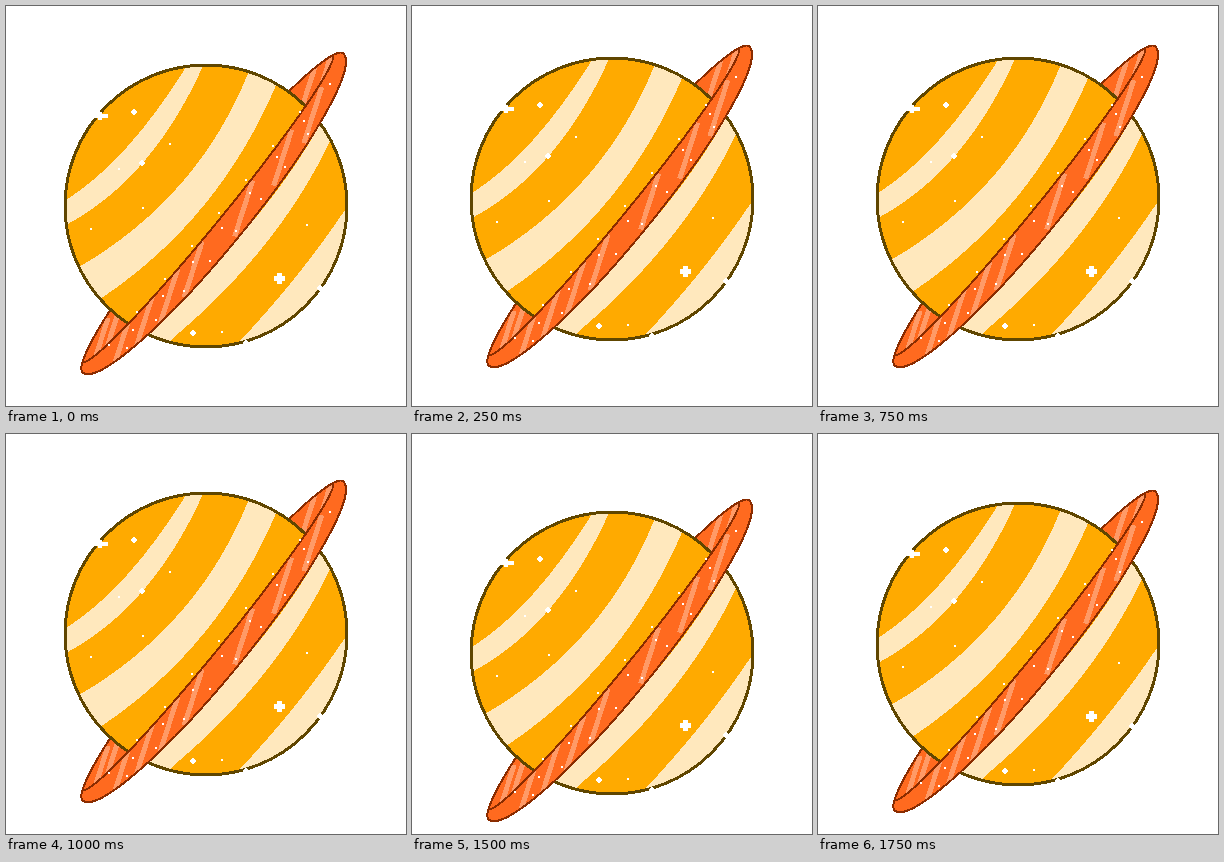
An HTML page that plays this animation: 400x400 px, repeating every 2000 ms.

```html
<!DOCTYPE html>
<html lang="en">
<head>
<meta charset="utf-8">
<title>Ringed planet</title>
<style>
  html, body { margin: 0; height: 100%; overflow: hidden; background: #fff; }
  svg { display: block; width: 100%; height: 100%; }
  .cream { fill: #ffe8bd; }
  .ring { fill: #ff6a1f; }
  .edge { fill: none; stroke: #8a2c00; stroke-width: 2; stroke-linejoin: round; }
  .shine { fill: none; stroke: #ff9a66; stroke-width: 5; }
</style>
</head>
<body>
<svg viewBox="0 0 400 400" shape-rendering="crispEdges">
  <defs>
    <path id="whole" transform="translate(207 207) rotate(-50.8)"
      d="M-206 0A206 25 0 0 1 206 0A206 35 0 0 1-206 0Z"/>
    <path id="front" transform="translate(207 207) rotate(-50.8)"
      d="M-198-7A198 16 0 0 0 198-7A206 25 0 0 1 206 0A206 35 0 0 1-206 0A206 25 0 0 1-198-7Z"/>
    <clipPath id="inWhole"><use href="#whole"/></clipPath>
    <clipPath id="inFront"><use href="#front"/></clipPath>
    <clipPath id="inBall"><circle cx="200" cy="200" r="141"/></clipPath>
  </defs>
  <g id="planet">
    <use href="#whole" class="ring"/>
    <path id="backShine" class="shine" clip-path="url(#inWhole)"/>
    <use href="#whole" class="edge"/>

    <circle cx="200" cy="200" r="141" fill="#ffaa00"/>
    <g class="cream" clip-path="url(#inBall)">
      <path d="M182 58Q122 155 60 194L50 222L60 219Q146 173 197 60L198 50Z"/>
      <path d="M243 65Q193 191 73 261L60 310L97 291Q214 212 271 77L275 50Z"/>
      <path d="M316 115Q259 218 138 328L150 350L167 332Q273 243 325 133L335 115Z"/>
      <path d="M341 201Q292 274 232 337L235 350H350V190Z"/>
    </g>
    <circle cx="200" cy="200" r="141" fill="none" stroke="#604600" stroke-width="3"/>

    <use href="#front" class="ring"/>
    <path id="frontShine" class="shine" clip-path="url(#inFront)"/>
    <use href="#front" class="edge"/>
    <path id="sparks" fill="#fff"/>
  </g>
</svg>
<script>
  const byId = id => document.getElementById(id);
  const tilt = -50.8 * Math.PI / 180;

  // Ring coordinates: u along its length, n across it at the middle, narrowing to the tips
  function onRing(u, n) {
    const v = n * Math.sqrt(1 - (u / 206) ** 2);
    return [
      207 + u * Math.cos(tilt) - v * Math.sin(tilt),
      207 + u * Math.sin(tilt) + v * Math.cos(tilt)
    ];
  }

  const rect = ([x, y], w, h = w) => `M${x - w / 2} ${y - h / 2}h${w}v${h}h${-w}z`;
  const cross = (p, w, h, t) => rect(p, w, t) + rect(p, t, h);
  const diamond = p => cross(p, 6, 6, 2) + rect(p, 4);

  // Slanted highlights centred at the given places along the ring
  const shine = (places, n) => places.map(u => {
    const [x, y] = onRing(u, n);
    return `M${x + 9} ${y - 28}l-18 56`;
  }).join('');
  byId('frontShine').setAttribute('d', shine([139, 87, 23, -56, -93, -130, -163], 21));
  byId('backShine').setAttribute('d', shine([185, 157, -150, -175], -8));

  // Three even rows of specks along the ring
  let specks = '';
  for (let i = 0; i < 8; i++) {
    specks += rect(onRing(133 - 43 * i, 5), 2)
      + rect(onRing(174 - 45 * i, 16), 2)
      + rect(onRing(121 - 40 * i, 29), 2);
  }
  const loose = [[164, 138], [113, 163], [137, 202], [85, 223], [301, 219], [216, 326]];
  const bright = [[128, 106], [136, 157], [187, 327], [240, 337], [314, 282]];
  specks += loose.map(p => rect(p, 2)).join('') + bright.map(diamond).join('')
    + cross([94, 110], 16, 8, 4) + rect([91, 109], 6)
    + cross([273, 272], 11, 11, 5);
  byId('sparks').setAttribute('d', specks);

  // Stepped bob: one vertical offset per quarter second
  const bob = [0, -7, -16, -7, 0, 10, 19, 10];
  const start = performance.now();

  function draw(now) {
    const step = Math.floor(Math.max(0, now - start) / 250) % bob.length;
    byId('planet').setAttribute('transform', `translate(0 ${bob[step]})`);
    requestAnimationFrame(draw);
  }
  draw(start);
</script>
</body>
</html>
```
